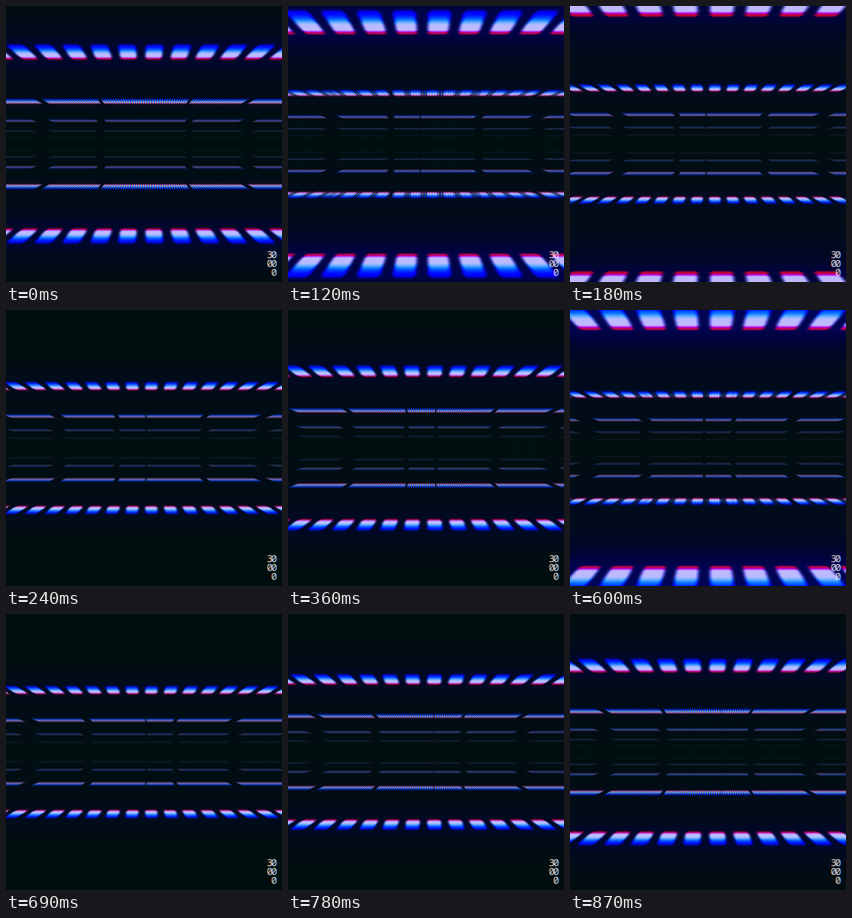
Write an HTML page with a canvas that moves like this. It is 500 px wide and 500 px high and loops after 900 ms.

```html
<!DOCTYPE html>
<html lang="en">
<head>
<meta charset="utf-8">
<title>Light corridor</title>
<style>
  html, body { margin: 0; width: 100%; height: 100%; overflow: hidden; background: #000c10; }
  canvas { display: block; width: 500px; height: 500px; }
</style>
</head>
<body>
<canvas id="stage" width="500" height="500"></canvas>
<script>
const SIZE = 500, HALF = 250, LOOP = 900, STEP = 30;
const DEPTH = 262, HORIZON = 37.5;   // screen height = DEPTH / z - HORIZON
const CELL = 61.2, CELL_PHASE = 0.385;
const GAP_PITCH = 106;

// Depth range of each colour relative to the band's far edge;
// haze softens the near edge in depth, on top of a blur in pixels.
const CHANNELS = [
  { peak: 188, near: -0.088, far: 0.008, haze: 0.018 },
  { peak: 182, near: -0.112, far: -0.020, haze: 0.030 },
  { peak: 255, near: -0.160, far: -0.012, haze: 0.014 }
];

const ctx = document.getElementById('stage').getContext('2d');
const image = ctx.createImageData(SIZE, SIZE);
const pixels = image.data;

const clamp = v => Math.max(0, Math.min(1, v));
const smooth = (a, b, v) => {
  const k = clamp((v - a) / (b - a));
  return k * k * (3 - 2 * k);
};
const wave = turns => Math.cos(turns * 2 * Math.PI);
const heightAt = z => DEPTH / z - HORIZON;

function glowAt(y, firstBand) {
  let sum = 0;
  for (let z = firstBand; z < 5; z++) {
    const inner = heightAt(z), outer = heightAt(z - 0.16);
    const visible = clamp((HALF - inner) / 30);
    const distance = Math.max(0, y - outer, inner - y);
    sum += 45 * visible * (1.3 / z) ** 2.5 * Math.exp(-distance / (inner * 0.2));
  }
  return sum;
}

function envelope({ near, far, haze }, rel, z) {
  const blur = 2.3 * z * z / DEPTH;
  const soft = blur + haze;
  return smooth(near - soft, near + soft, rel) * (1 - smooth(far - blur, far + blur, rel));
}

function gap(x, origin, halfWidth) {
  if (halfWidth <= 0) return 1;
  const offset = (x - origin) / GAP_PITCH;
  const distance = Math.abs(offset - Math.round(offset)) * GAP_PITCH;
  return smooth(halfWidth - 2, halfWidth + 2, distance);
}

function put(x, row, rgb) {
  for (const y of [row, SIZE - 1 - row]) {
    const i = (y * SIZE + x) * 4;
    pixels[i] = rgb[0];
    pixels[i + 1] = rgb[1];
    pixels[i + 2] = rgb[2];
    pixels[i + 3] = 255;
  }
}

function drawRow(row, t, firstBand) {
  const y = HALF - row - 0.5;
  const z = DEPTH / (y + HORIZON);
  const offset = z - firstBand + 0.08;
  const rel = offset - Math.round(offset) - 0.08;
  const bandZ = z - rel - 0.07;
  const far = smooth(1.85, 2.2, bandZ);

  const glow = glowAt(y, firstBand);
  const base = [1, 14 * (1 - 0.8 * clamp(glow / 50)), 15 + glow * 0.85];
  const strength = Math.min(1, (Math.max(0, 6 - z) / 3.8) ** 1.6) * (1 + 0.45 * far);
  const shape = CHANNELS.map(c => envelope(c, rel, z));
  const light = CHANNELS.map((c, i) => c.peak * strength * shape[i]);
  const lit = Math.max(...light) > 1;

  const gapScale = 0.45 + 0.55 * smooth(2.5, 3, bandZ);
  const drift = GAP_PITCH * t;
  const rgb = [0, 0, 0];

  for (let x = 0; x < SIZE; x++) {
    if (!lit) {
      put(x, row, base);
      continue;
    }
    const u = (x + 0.5 - HALF) * z / CELL;
    const cell = wave(u - CELL_PHASE);
    let gaps = 1;
    if (far > 0) {
      const sx = HALF + (x - HALF) * z / bandZ;
      gaps = gap(sx, 66 + drift, (275 - sx) * 0.07 * gapScale) *
             gap(sx, 13 + drift, (sx - 225) * 0.06 * gapScale);
    }
    for (let c = 0; c < 3; c++) {
      // Fainter rows are narrower, which rounds the corners of each light.
      const stripe = smooth(-0.95, 0.1, cell - 0.5 * (1 - shape[c]));
      const fringe = far ? gaps * (0.58 + 0.36 * wave(u * 6.2 + c * 0.25)) : 0;
      rgb[c] = base[c] + light[c] * (stripe * (1 - far) + fringe * far);
    }
    put(x, row, rgb);
  }
}

function drawCounter() {
  ctx.save();
  ctx.font = 'extra-condensed 18px "Noto Sans Mono", "DejaVu Sans Mono", monospace';
  ctx.textAlign = 'center';
  ctx.globalCompositeOperation = 'screen';
  const tints = ['#c0301c', '#20a830', '#1a30b8'];
  tints.forEach((tint, i) => {
    ctx.fillStyle = tint;
    ['30', '00', '0'].forEach((line, n) => {
      [...line].forEach((digit, k) => {
        const x = 494 - 8 * (line.length - k);
        ctx.fillText(digit, x + (i - 1) * 0.8, 456.5 + 16 * n);
      });
    });
  });
  ctx.restore();
}

function draw(t) {
  let firstBand = 1.369 - 2 * t;
  while (firstBand < 0.84) firstBand++;
  for (let row = 0; row < HALF; row++) drawRow(row, t, firstBand);
  ctx.putImageData(image, 0, 0);
  drawCounter();
}

let shown = -1;
function tick() {
  const step = Math.floor((performance.now() % LOOP) / STEP);
  if (step !== shown) {
    shown = step;
    draw(step * STEP / LOOP);
  }
  requestAnimationFrame(tick);
}
tick();
</script>
</body>
</html>
```
